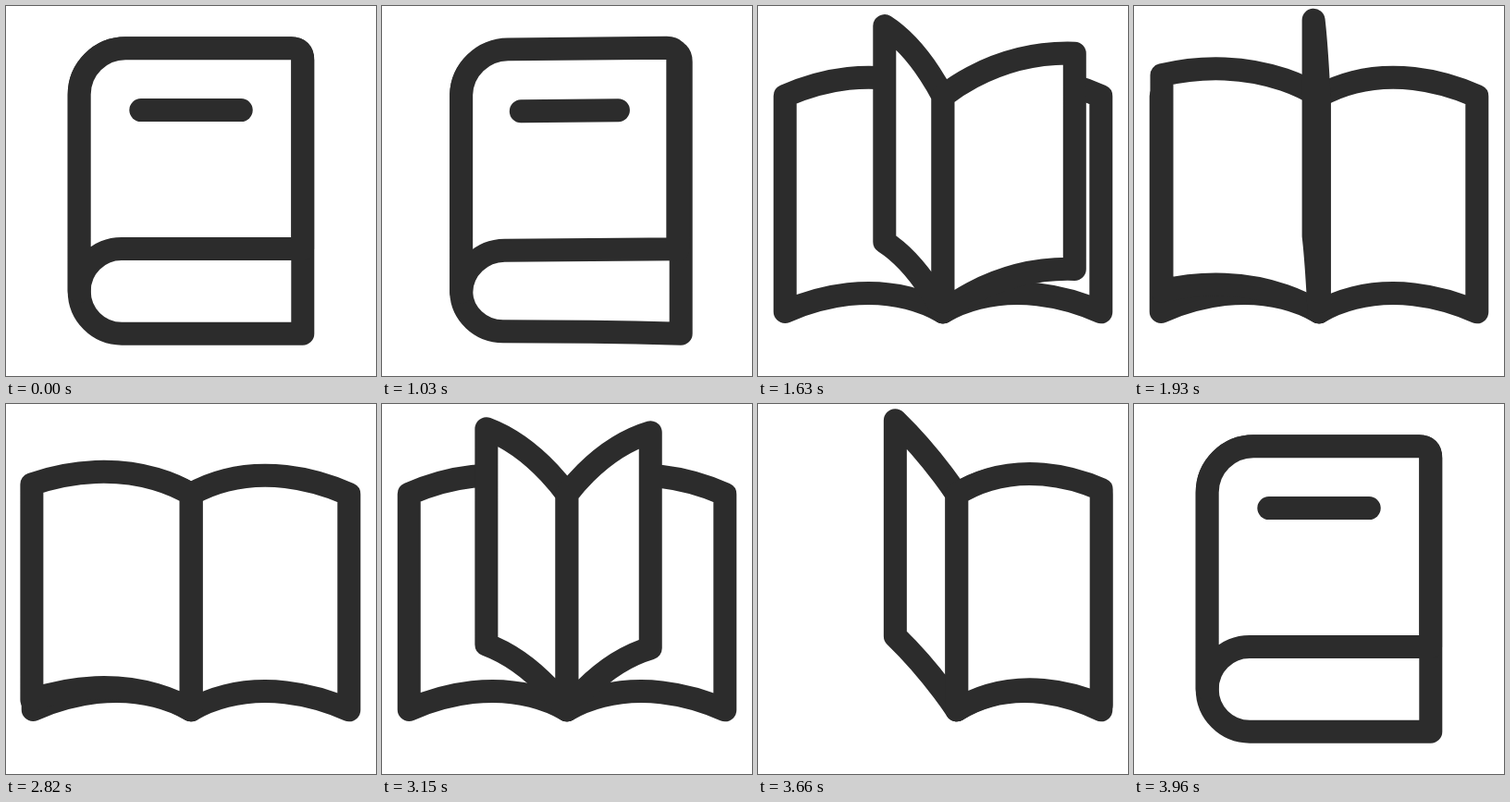
An HTML page with a canvas that plays this animation: 400x400 px, repeating every 4.02 s.

```html
<!DOCTYPE html>
<html lang="en">
<head>
<meta charset="utf-8">
<title>Book</title>
<style>
html, body { margin: 0; width: 100%; height: 100%; overflow: hidden; background: #fff; }
canvas { display: block; width: 400px; height: 400px; }
</style>
</head>
<body>
<canvas id="stage" width="400" height="400"></canvas>
<script>
const ctx = document.getElementById('stage').getContext('2d');
const INK = '#2c2c2c';
const LOOP = 4020, STEP = 30;
const OPEN_AT = 1030, CLOSE_AT = 2820;
const TOP = 97.5, TALL = 233.3;
const MORPH = 210, COVER_TIME = 465;
// When each page stands upright, and how long its turn takes.
const PAGES = [{ mid: 545, span: 505 }, { mid: 737, span: 407 }, { mid: 904, span: 505 }];

const clamp = v => Math.max(0, Math.min(1, v));
const mix = (a, b, k) => a + (b - a) * k;
const mixPt = (a, b, k) => [mix(a[0], b[0], k), mix(a[1], b[1], k)];
const smooth = k => k * k * (3 - 2 * k);
const rad = d => d * Math.PI / 180;

// Progress through the opening, in ms; closing runs it backwards.
function progress(t) {
  const snap = v => Math.floor(v / STEP) * STEP;
  if (t < OPEN_AT) return 0;
  if (t < CLOSE_AT) return Math.min(1180, snap(t - OPEN_AT) + 10);
  return Math.max(0, 1140 - snap(t - CLOSE_AT));
}

// Bulging page edge from spine s to outer corner e, as two cubics.
function bulge(s, e, b) {
  const at = f => [mix(s[0], e[0], f), mix(s[1], e[1], f) - b];
  const p1 = at(0.275), p2 = at(0.644), k = 0.25;
  const a = mixPt(s, p1, k), m = mixPt(p1, p2, k), z = mixPt(p2, e, k);
  const am = mixPt(a, m, k), mz = mixPt(m, z, k);
  return [s, a, am, mixPt(am, mz, k), mz, z, e];
}

// Quarter round at the spine, then a straight run to e.
function corner(s, e) {
  const dy = e[1] - s[1], r = Math.abs(dy) * Math.sign(e[0] - s[0]), q = 0.552;
  const k = [s[0] + r, e[1]];
  return [s, [s[0], s[1] + q * dy], [s[0] + r * (1 - q), e[1]], k,
    mixPt(k, e, 1 / 3), mixPt(k, e, 2 / 3), e];
}

function edge(s, e, b, open) {
  const flat = bulge(s, e, b);
  if (open >= 1) return flat;
  return corner(s, e).map((p, i) => mixPt(p, flat[i], open));
}

function curve(p) {
  ctx.bezierCurveTo(...p[1], ...p[2], ...p[3]);
  ctx.bezierCurveTo(...p[4], ...p[5], ...p[6]);
}

function leaf(sx, sTop, sBot, ex, eTop, eBot, b, open = 1) {
  const r = 12.5 * (1 - open);
  const top = edge([sx, sTop], [ex - r, eTop], b, open);
  const bottom = edge([sx, sBot], [ex, eBot], b, open).reverse();
  ctx.beginPath();
  ctx.moveTo(...top[0]);
  curve(top);
  if (r > 0) ctx.quadraticCurveTo(ex, eTop, ex, eTop + r);
  ctx.lineTo(...bottom[0]);
  curve(bottom);
  ctx.closePath();
  ctx.fill();
  ctx.stroke();
}

function drawPage(sx, reach, a) {
  const c = Math.cos(rad(a)), s = Math.sin(rad(a));
  const sag = (c > 0 ? 12 : 5) * Math.abs(c) * Math.max(0, s);
  const y = 85 - 70 * s + sag;
  leaf(sx, TOP, TOP + TALL, sx + reach * 1.008 * c, y, y + TALL, 27 - 0.19 * (TOP - y));
}

function drawTitle(sx, sTop, ex, eTop, a, open) {
  const size = clamp((80 - a) / 30);
  if (size <= 0) return;
  const at = f => [mix(sx, ex, f), eTop + 66.7 + (sTop - eTop) * (1 - f) * open];
  ctx.lineWidth = 25 * size;
  ctx.beginPath();
  ctx.moveTo(...at(0.276));
  ctx.lineTo(...at(0.725));
  ctx.stroke();
  ctx.lineWidth = 25;
}

function draw(p) {
  const open = clamp(p / MORPH), soft = open * open;
  const sx = mix(79.2, 215, open) - 15 * smooth(clamp((p - 290) / 180));
  const right = mix(320.8, 370.8, open), reach = right - sx;
  const sTop = mix(95.8, TOP, open), sBot = mix(308.3, TOP + TALL, open);

  const a = 34 + 156 * Math.pow(clamp(p / COVER_TIME), 1.5);
  const c = Math.cos(rad(a)), s = Math.sin(rad(a));
  const cx = sx + reach * (1.0152 + 0.19 * (1 - open)) * c;
  const cy = 85 - 70 * s - 10 * Math.abs(c) * Math.max(0, s) * soft;

  const cover = () => {
    leaf(sx, sTop, sBot, cx, cy, cy + mix(216.7, TALL, open), 27 - 0.27 * (TOP - cy), open);
    drawTitle(sx, sTop, cx, cy, a, open);
  };
  // Pages turn quickest as they lift and land.
  const pages = PAGES
    .map(({ mid, span }) => (p - mid) / span)
    .filter(u => Math.abs(u) < 0.5)
    .map(u => 90 + 165 * u + 140 * u ** 3);

  ctx.fillStyle = '#fff';
  ctx.fillRect(0, 0, 400, 400);
  ctx.strokeStyle = INK;
  ctx.lineWidth = 25;
  ctx.lineCap = ctx.lineJoin = 'round';

  leaf(sx, sTop, sBot, right, mix(45.8, TOP, open), mix(354.2, TOP + TALL, soft), 27, open);
  if (a > 90) cover();
  pages.filter(d => d > 90).forEach(d => drawPage(sx, reach, d));
  pages.filter(d => d <= 90).reverse().forEach(d => drawPage(sx, reach, d));
  if (a <= 90) cover();
}

const begin = performance.now();
function tick() {
  draw(progress((performance.now() - begin) % LOOP));
  requestAnimationFrame(tick);
}
tick();
</script>
</body>
</html>
```
